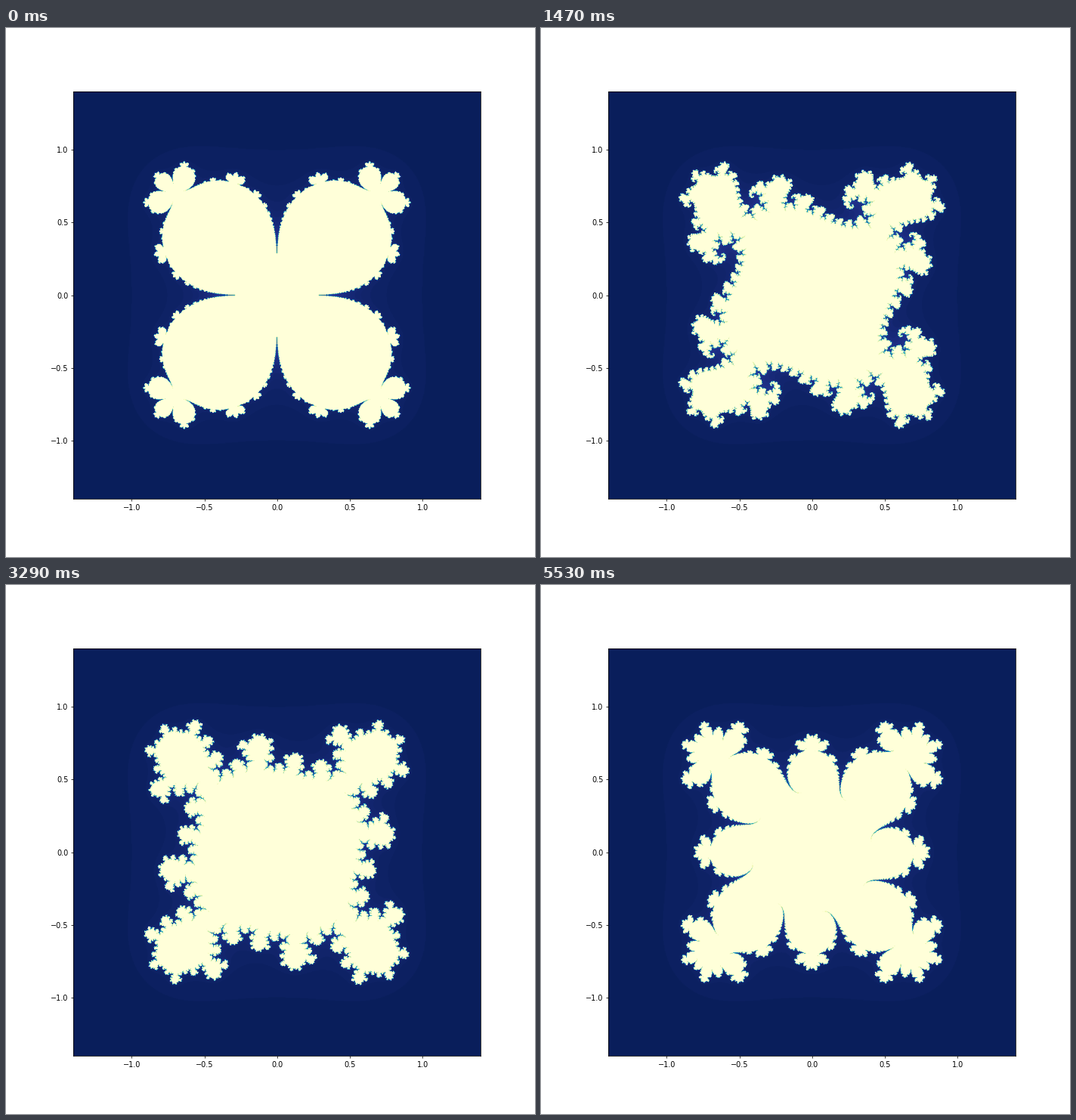
A matplotlib script for the animation above (5.6 s loop, 700 px wide and 700 px high).

```python
import numpy as np
import matplotlib.pyplot as plt
from matplotlib.animation import FuncAnimation

FRAMES = 80
INTERVAL = 70
TURN_STEP = 0.01    # radians per frame
HALF = 400          # grid points along one side of a quadrant
SPAN = 1.4
MAX_ITER = 100

# Upper right quadrant; the set has four-fold rotational symmetry.
side = SPAN * (2 * np.arange(HALF) + 1) / (2 * HALF - 1)
quadrant = side[None, :] + 1j * side[:, None]
start = (quadrant ** 4).ravel().astype(np.complex64)


def escape_times(turn):
    """Escape times of z -> e^(i turn) (z + z^5), followed through w = z^4."""
    factor = np.complex64(np.exp(4j * turn))
    times = np.full(start.size, MAX_ITER, dtype=np.float32)
    alive = np.arange(start.size)
    w = start.copy()
    for n in range(1, MAX_ITER):
        s = 1 + w
        s *= s
        s *= s
        w *= s
        w *= factor
        out = w.real ** 2 + w.imag ** 2 > 256
        if out.any():
            times[alive[out]] = n
            alive, w = alive[~out], w[~out]
    return times.reshape(HALF, HALF)


def julia(frame):
    q = escape_times(TURN_STEP * frame)
    # Rows run upwards; each further quadrant is a quarter turn of the first.
    upper_left = np.rot90(q, -1)
    lower_left = np.rot90(q, 2)
    lower_right = np.rot90(q, 1)
    return np.block([[lower_left, lower_right], [upper_left, q]])


fig, ax = plt.subplots(figsize=(10, 10), dpi=70)
image = ax.imshow(julia(0), cmap="YlGnBu_r", vmin=0, vmax=MAX_ITER,
                  origin="lower", extent=(-SPAN, SPAN, -SPAN, SPAN))


def update(frame):
    image.set_data(julia(frame))
    return image,


anim = FuncAnimation(fig, update, frames=FRAMES, interval=INTERVAL,
                     repeat=True, repeat_delay=0)
plt.show()
```
